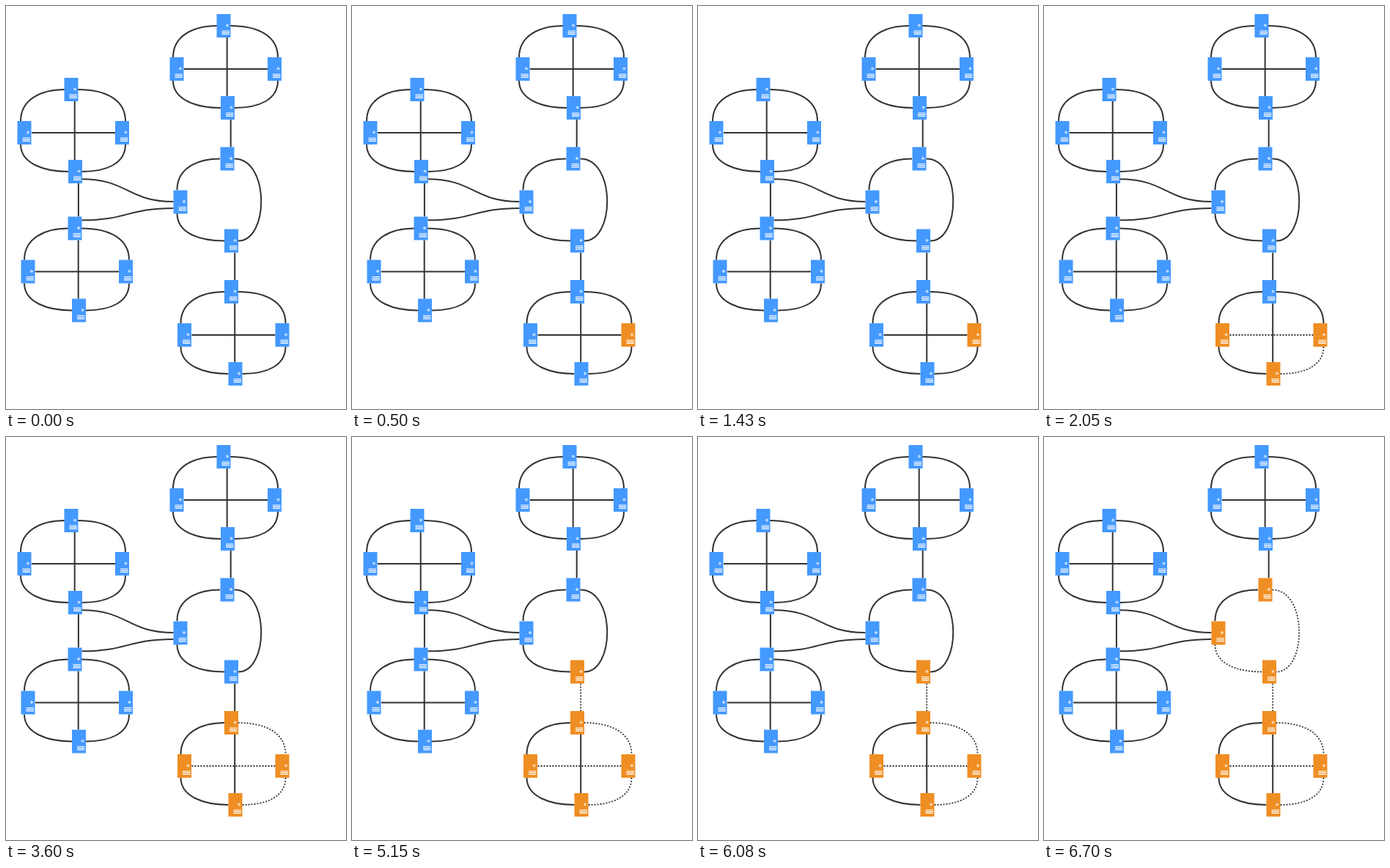
An HTML page that plays this animation: 464x550 px, repeating every 8000 ms.

```html
<!DOCTYPE html>
<html>
<head>
<meta charset="utf-8">
<style>
  html, body { margin: 0; width: 100%; height: 100%; overflow: hidden; background: #fff; }
  svg { display: block; }
  path { fill: none; stroke: #333; stroke-width: 2; }
  .edge.on { stroke-width: 1.8; stroke-dasharray: 2 2; }
  .node { fill: #4499ff; }
  .node.on { fill: #ef8e23; }
  .node path { stroke: #fff; stroke-width: 1.2; }
  .node circle { fill: #fff; fill-opacity: .35; stroke: #fff; stroke-width: .8; }
</style>
</head>
<body>
<svg id="stage" width="464" height="550" viewBox="0 0 464 550"></svg>
<script>
const LOOP = 8000;
const stage = document.getElementById('stage');
const edges = [], nodes = [], timed = [];

// "at" is the time a part becomes affected; parts without it never change.
function edge(d, at) { edges.push({ cls: 'edge', at, body: `<path class="edge" d="${d}"/>` }); }
function node(x, y, at) {
  nodes.push({ cls: 'node', at, body: `<g class="node" transform="translate(${x} ${y})">
    <rect x="-9.5" y="-16" width="19" height="32"/><circle cx="5" cy="-.5" r="1.4"/>
    <path d="M-2.5 7h10.5M-2.5 9.2h10.5M-2.5 11.4h10.5"/></g>` });
}

// Four servers joined by a ring and a cross, placed from the top server.
function cluster(x, y, t = {}) {
  const l = x - 69, r = x + 74, b = y + 112, m = y + 59;
  edge(`M${l} ${y + 43}C${l} ${y + 14} ${x - 42} ${y} ${x - 9} ${y}`);
  edge(`M${x + 9} ${y}C${x + 47} ${y} ${r} ${y + 14} ${r} ${y + 43}`, t.topRight);
  edge(`M${l} ${y + 75}C${l} ${y + 101} ${x - 37} ${b} ${x - 4} ${b}`);
  edge(`M${x + 15} ${b}C${x + 48} ${b} ${r} ${y + 101} ${r} ${y + 75}`, t.cross);
  edge(`M${x - 54} ${m}H${x + 60}`, t.cross);
  edge(`M${x + 4.7} ${y + 16}V${b - 16}`);
  node(x, y, t.topRight);
  node(x - 64, m, t.cross);
  node(x + 69.5, m, t.right);
  node(x + 5.5, b, t.cross);
}

cluster(297, 27);
cluster(89, 114);
cluster(94, 303.5);
cluster(307.5, 390, { right: 500, cross: 2050, topRight: 3600 });

// Central ring
edge('M233.5 251C233.5 222 260 208.5 292 208.5');
edge('M233.5 283C233.5 309 262 320.5 298 320.5', 6700);
edge('M311.5 208.5C360 208.5 359 320.5 317 320.5', 6700);
node(302, 208.5, 6700);
node(238, 267.5, 6700);
node(307.5, 320.5, 5150);

// Links between the groups
edge('M306.7 155V192.5');
edge('M312.2 336.5V374', 5150);
edge('M98.9 242V287.5');
edge('M103.5 236.3C166 236.3 166 267 228.5 267');
edge('M103.5 292.3C166 292.3 166 276 228.5 276');

const parts = [...edges, ...nodes];
stage.innerHTML = parts.map(p => p.body).join('');
parts.forEach((p, i) => { if (p.at) timed.push({ el: stage.children[i], at: p.at }); });

const start = performance.now();
function draw() {
  const t = (performance.now() - start) % LOOP;
  for (const p of timed) p.el.classList.toggle('on', t >= p.at);
  requestAnimationFrame(draw);
}
draw();
</script>
</body>
</html>
```
